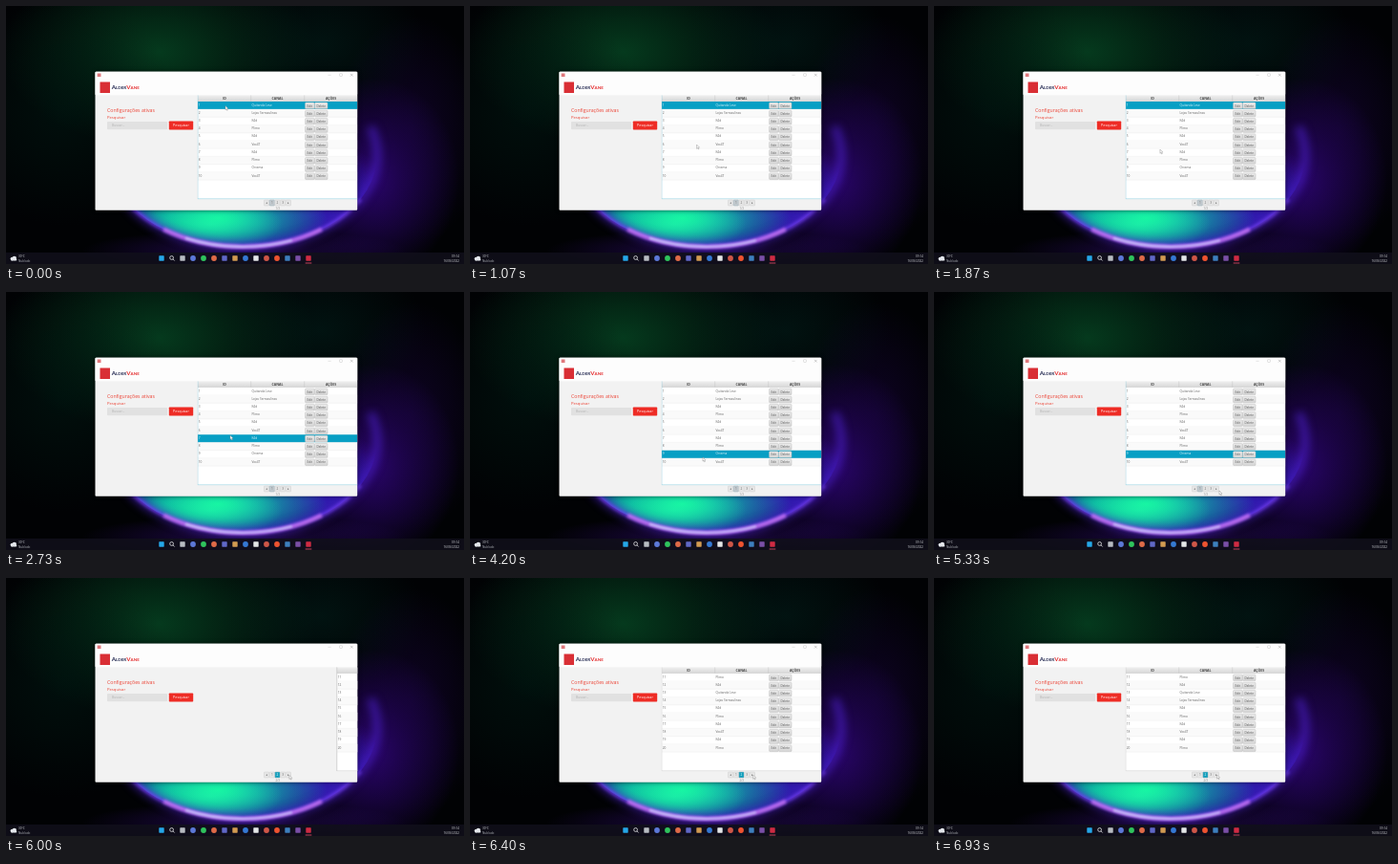
Recreate the animation shown at these times as an HTML page with a canvas. Size 480 by 270 pixels, loop 7.07 s.

```html
<!DOCTYPE html>
<html lang="pt-BR">
<head>
<meta charset="utf-8">
<title>Configurações ativas</title>
<style>
html, body { margin: 0; width: 100%; height: 100%; overflow: hidden; background: #010204; }
canvas { display: block; width: 480px; height: 270px; }
</style>
</head>
<body>
<canvas id="stage"></canvas>
<script>
const W = 480, H = 270, LOOP = 7070;
const stage = document.getElementById('stage');
const dpr = window.devicePixelRatio || 1;
const SANS = '"Open Sans", "Noto Sans", sans-serif';

function sized(canvas) {
  canvas.width = W * dpr;
  canvas.height = H * dpr;
  const g = canvas.getContext('2d');
  g.scale(dpr, dpr);
  return g;
}

let ctx = sized(stage);

function box(x, y, w, h, fill, r = 0, stroke) {
  ctx.beginPath();
  ctx.roundRect(x, y, w, h, r);
  ctx.fillStyle = fill;
  ctx.fill();
  if (stroke) {
    ctx.strokeStyle = stroke;
    ctx.lineWidth = 0.5;
    ctx.stroke();
  }
}

function disc(x, y, r, fill) {
  ctx.beginPath();
  ctx.arc(x, y, r, 0, Math.PI * 2);
  ctx.fillStyle = fill;
  ctx.fill();
}

function line(points, color, width = 0.6) {
  ctx.beginPath();
  points.forEach(([x, y], i) => i ? ctx.lineTo(x, y) : ctx.moveTo(x, y));
  ctx.strokeStyle = color;
  ctx.lineWidth = width;
  ctx.stroke();
}

function text(str, x, y, size, color, align = 'left', weight = 400, family = SANS) {
  ctx.font = `${weight} ${size}px ${family}`;
  ctx.textAlign = align;
  ctx.textBaseline = 'alphabetic';
  ctx.fillStyle = color;
  ctx.fillText(str, x, y);
}

// Soft elliptical light; rgb is "r,g,b"
function glow(x, y, rx, ry, rgb, alpha) {
  ctx.save();
  ctx.translate(x, y);
  ctx.scale(rx, ry);
  const g = ctx.createRadialGradient(0, 0, 0, 0, 0, 1);
  g.addColorStop(0, `rgba(${rgb},${alpha})`);
  g.addColorStop(0.5, `rgba(${rgb},${alpha * 0.5})`);
  g.addColorStop(1, `rgba(${rgb},0)`);
  ctx.fillStyle = g;
  ctx.fillRect(-1, -1, 2, 2);
  ctx.restore();
}

function globe(from = 0, to = 2) {
  ctx.beginPath();
  ctx.ellipse(248, 156, 141, 96, 0, from * Math.PI, to * Math.PI);
}

function rim(from, to, color, width, blur) {
  ctx.save();
  ctx.filter = `blur(${blur * dpr}px)`;
  globe(from, to);
  ctx.strokeStyle = color;
  ctx.lineWidth = width;
  ctx.stroke();
  ctx.restore();
}

function wallpaper() {
  box(0, 0, W, H, '#010204');
  glow(160, 48, 165, 100, '6,72,36', 0.8);
  glow(60, 110, 120, 120, '0,24,18', 0.6);
  glow(330, 40, 110, 80, '2,36,30', 0.5);
  glow(385, 180, 90, 105, '62,6,160', 0.7);
  glow(425, 130, 80, 120, '28,4,70', 0.5);
  glow(250, 256, 170, 22, '50,12,120', 0.6);

  ctx.save();
  ctx.beginPath();
  ctx.rect(0, 110, W, H);
  ctx.clip();
  globe();
  ctx.clip();
  glow(248, 222, 175, 85, '28,42,205', 1);
  glow(335, 205, 75, 60, '70,28,215', 0.7);
  glow(170, 222, 80, 40, '0,130,190', 0.7);
  glow(222, 222, 115, 38, '15,240,155', 1);
  glow(215, 228, 75, 28, '30,250,170', 0.7);
  ctx.restore();

  rim(-0.1, 0.95, 'rgba(80,35,215,0.55)', 9, 4);
  rim(0.16, 0.82, 'rgba(110,60,235,0.75)', 4, 1.8);
  rim(0.3, 0.7, 'rgba(205,120,245,0.85)', 4, 1.8);
  rim(0.38, 0.64, 'rgba(205,225,255,0.75)', 2.2, 1.2);
}

const icons = [
  ['s', '#25a7e8'], ['search'], ['s', '#b8bcc2'], ['c', '#5c78d8'], ['c', '#2fc35d'],
  ['c', '#df6a48'], ['s', '#6068c8'], ['s', '#d29a52'], ['c', '#3578d4'], ['s', '#e4e6e8'],
  ['c', '#cf5648'], ['c', '#ee5330'], ['s', '#3d7fbe'], ['s', '#7a4fa7'], ['s', '#cf2b43']
];

function taskbar() {
  box(0, 258, W, 12, 'rgba(17,15,27,0.88)');
  icons.forEach(([kind, color], i) => {
    const x = 163 + i * 11, y = 264;
    if (kind === 'c') disc(x, y, 2.9, color);
    else if (kind === 's') box(x - 2.7, y - 2.7, 5.4, 5.4, color, 0.6);
    else {
      ctx.beginPath();
      ctx.arc(x - 0.4, y - 0.5, 1.9, 0, Math.PI * 2);
      ctx.strokeStyle = '#e6e8ea';
      ctx.lineWidth = 0.8;
      ctx.stroke();
      line([[x + 1, y + 0.9], [x + 2.6, y + 2.5]], '#e6e8ea', 0.8);
    }
  });
  box(313.5, 268.6, 7, 0.9, '#c4475a', 0.4);
  disc(6.4, 264.6, 1.8, '#e4e7ec');
  disc(8.8, 264, 2.2, '#e4e7ec');
  box(5, 264.4, 6.3, 2, '#e4e7ec', 1);
  text('30°C', 13, 263.3, 3.1, '#d4d6da');
  text('Nublado', 13, 267.5, 3.1, '#a9acb2');
  text('09:14', 475, 263.3, 3.1, '#d4d6da', 'right');
  text('16/06/2022', 475, 267.5, 3.1, '#d4d6da', 'right');
}

function brand() {
  box(98.5, 79.5, 10.5, 11.5, '#d92f35');
  let x = 110.7;
  for (const [word, color] of [['ALDER', '#20264f'], ['VANE', '#e32b2d']]) {
    for (const [part, size] of [[word[0], 6.2], [word.slice(1), 4.5]]) {
      text(part, x, 87.4, size, color, 'left', 700, 'Lato, sans-serif');
      x += ctx.measureText(part).width;
    }
  }
}

function appWindow() {
  ctx.save();
  ctx.shadowColor = 'rgba(0,0,0,0.6)';
  ctx.shadowBlur = 4 * dpr;
  box(93.5, 68.7, 274.7, 145, '#f2f2f2', 1);
  ctx.restore();
  box(93.5, 68.7, 274.7, 24.5, '#fdfdfd', 1);
  box(95.7, 70.5, 3.8, 3.6, '#e0787c');
  line([[337.5, 72.3], [340.5, 72.3]], '#bbb', 0.4);
  ctx.strokeRect(349.8, 70.9, 2.6, 2.6);
  line([[361, 70.9], [363.6, 73.5]], '#888', 0.4);
  line([[363.6, 70.9], [361, 73.5]], '#888', 0.4);
  brand();
  text('Configurações ativas', 106, 111.4, 5.2, '#ec4335');
  text('Pesquisar', 106, 118, 4.2, '#ec4335');
  box(106, 121, 63, 8.3, '#e1e1e1', 0.8);
  text('Buscar...', 111, 126.3, 3.4, '#b2b2b2');
  box(170.8, 120.5, 25.4, 9, '#ee2c25', 0.8);
  text('Pesquisar', 183.5, 126.3, 3.7, '#fff', 'center');
}

const [A, B, C, D, E, F] =
  ['Quitanda Leve', 'Lojas Serrazulinas', 'K4d', 'Plimo', 'Vox4T', 'Orvema'];
const pages = [
  [A, B, C, D, C, E, C, D, F, E],
  [D, C, A, B, C, D, C, E, C, D]
];
const table = { x: 200.8, y: 93.2, right: 368.2, bottom: 202, rowTop: 99.9, pitch: 8.22 };

function button(label, x, y, w) {
  const g = ctx.createLinearGradient(0, y, 0, y + 6.6);
  g.addColorStop(0, '#ececec');
  g.addColorStop(1, '#d4d4d4');
  box(x, y, w, 6.6, g, 0.9, '#bcbcbc');
  text(label, x + w / 2, y + 4.5, 3.1, '#555', 'center');
}

function drawTable(page, selected, shift) {
  const { x, y, right, bottom, rowTop, pitch } = table;
  ctx.save();
  ctx.beginPath();
  ctx.rect(x, y, right - x, bottom - y + 0.3);
  ctx.clip();
  ctx.translate(shift, 0);
  box(x, y, right - x, bottom - y, '#fff');
  const head = ctx.createLinearGradient(0, y, 0, rowTop);
  head.addColorStop(0, '#f0f0f0');
  head.addColorStop(1, '#d6d6d6');
  box(x, y, right - x, rowTop - y, head);
  [['ID', 229], ['CANAL', 284.5], ['AÇÕES', 340.5]].forEach(([name, cx]) =>
    text(name, cx, 97.9, 3.5, '#444', 'center', 700));
  [256.7, 312.7].forEach(cx => line([[cx, y], [cx, rowTop]], '#c0c0c0', 0.4));

  pages[page].forEach((name, i) => {
    const top = rowTop + i * pitch, active = i === selected;
    if (active) box(x, top, right - x, pitch, '#079fc4');
    else if (i % 2) box(x, top, right - x, pitch, '#fafafa');
    line([[x, top + pitch], [right, top + pitch]], '#e9e9e9', 0.4);
    const ink = active ? '#e2f4fa' : '#666';
    text(page * 10 + i + 1, 201.8, top + 4.7, 3.2, ink);
    text(name, 257.4, top + 4.7, 3.2, ink);
    button('Edit', 313.6, top + 1.1, 9.5);
    button('Delete', 323.5, top + 1.1, 13.5);
  });
  const edge = selected < 0 ? '#c4c4c4' : '#74c3d8';
  line([[x, y], [x, bottom], [right, bottom]], edge, 0.7);
  ctx.restore();
}

function pager(page) {
  ['◂', '1', '2', '3', '▸'].forEach((label, i) => {
    const on = i === page + 1, x = 270.5 + i * 5.7;
    const fill = on ? (page ? '#109fbd' : '#c2cacf') : '#e6e6e6';
    box(x, 203, 5.2, 6, fill, 0.6, on ? '#9db0b8' : '#d0d0d0');
    text(label, x + 2.6, 207.2, 3.2, on && page ? '#fff' : '#666', 'center');
  });
  text(`${page + 1}/3`, 284.7, 212.9, 2.9, '#888', 'center');
}

// [ms, x, y] of the pointer tip
const path = [
  [0, 230, 104.6], [270, 230.5, 105], [530, 230.5, 105], [730, 231, 106],
  [930, 232, 110], [1070, 237.6, 145.2], [1600, 240, 150], [2070, 235, 150.2],
  [3070, 235, 150.2], [3130, 238, 153], [3470, 238, 153], [3530, 240, 177],
  [3670, 240, 177], [4200, 244, 173], [4530, 244, 173], [5200, 298, 207.5],
  [5330, 299, 208], [5600, 297, 206.5], [LOOP, 296.6, 206]
];

function pointerAt(t) {
  const i = path.findIndex(p => p[0] > t);
  const [t0, x0, y0] = path[i - 1], [t1, x1, y1] = path[i];
  const k = smooth((t - t0) / (t1 - t0));
  return [x0 + (x1 - x0) * k, y0 + (y1 - y0) * k];
}

function smooth(k) {
  k = Math.min(1, Math.max(0, k));
  return k * k * (3 - 2 * k);
}

function pointer([x, y]) {
  ctx.beginPath();
  [[0, 0], [0, 4.1], [1, 3.3], [1.7, 4.7], [2.3, 4.5], [1.7, 3], [2.9, 2.9]]
    .forEach(([dx, dy]) => ctx.lineTo(x + dx, y + dy));
  ctx.closePath();
  ctx.fillStyle = '#fff';
  ctx.fill();
  ctx.strokeStyle = '#8a8a8a';
  ctx.lineWidth = 0.45;
  ctx.stroke();
}

const main = ctx;
const backdrop = document.createElement('canvas');
ctx = sized(backdrop);
wallpaper();
taskbar();
appWindow();
ctx = main;

const TURN = 5930, SLIDE = 5945;

function draw(t) {
  ctx.drawImage(backdrop, 0, 0, W, H);
  const page = t < TURN ? 0 : 1;
  const selected = page ? -1 : t < 2330 ? 0 : t < 3670 ? 6 : 8;
  const shift = page ? (1 - smooth((t - SLIDE) / 250)) * (table.right - table.x) : 0;
  drawTable(page, selected, shift);
  pager(page);
  pointer(pointerAt(t));
}

const start = performance.now();
function tick() {
  draw((performance.now() - start) % LOOP);
  requestAnimationFrame(tick);
}
tick();
</script>
</body>
</html>
```
